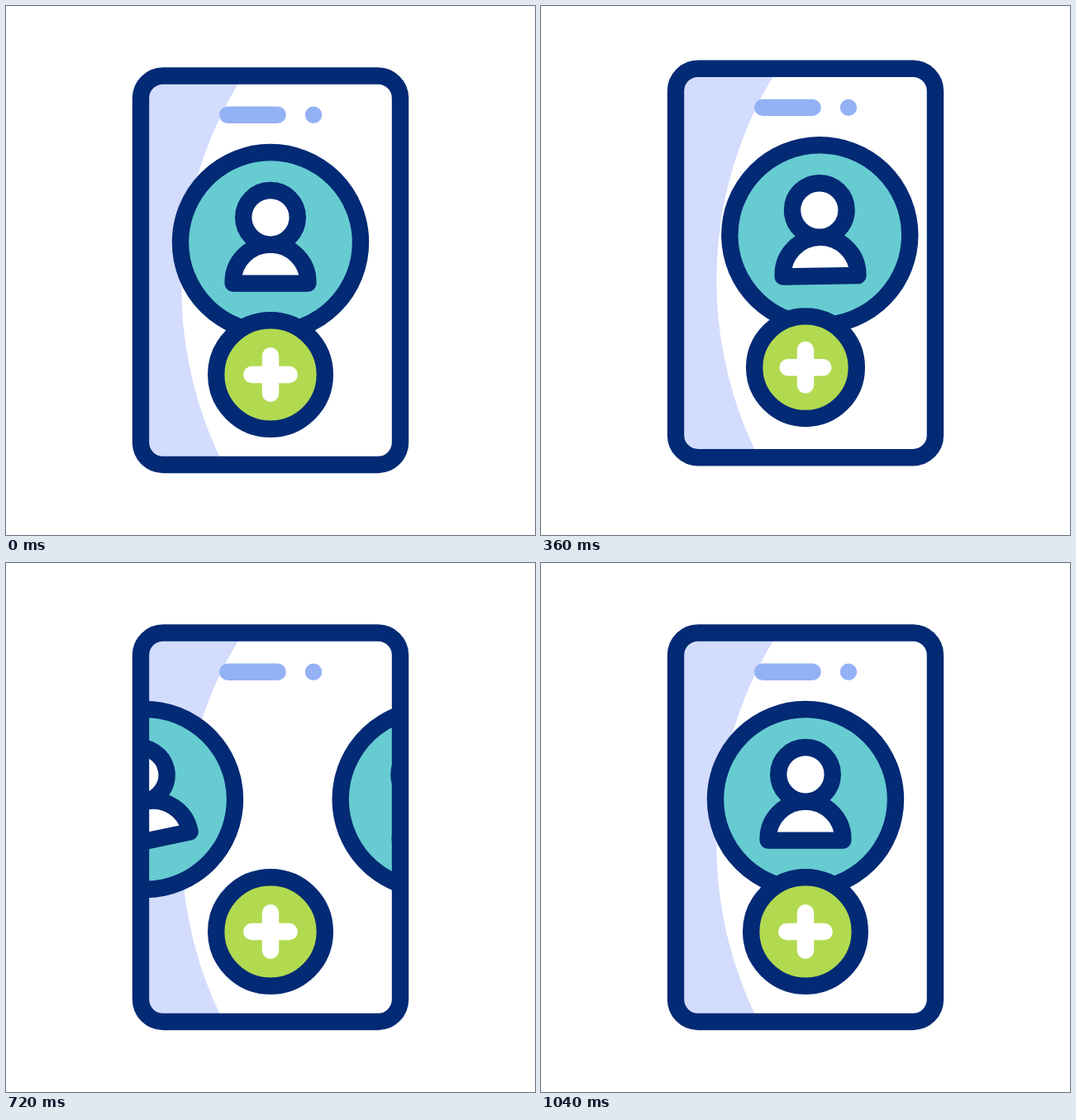
An HTML page for the animation above (1480 ms loop, 640 by 640 pixels).

```html
<!DOCTYPE html>
<html lang="en">
<head>
<meta charset="utf-8">
<title>Add contact</title>
<style>
  html, body { margin: 0; width: 100%; height: 100%; overflow: hidden; background: #fff; }
  svg { display: block; width: 100%; height: 100%; }
  .line { stroke: #032a75; stroke-width: 20.4; stroke-linecap: round; stroke-linejoin: round; }
  .plus { stroke: #fff; }
  .notch { stroke: #93b1f5; }
  .line * { vector-effect: non-scaling-stroke; }
</style>
</head>
<body>
<svg viewBox="0 0 640 640">
  <defs>
    <clipPath id="screen"><rect x="163" y="84.5" width="314" height="470.5" rx="27"/></clipPath>
    <g id="avatar" class="line" fill="#fff">
      <circle r="109" fill="#66ccd1"/>
      <path d="M-45.4 49.6V48a45.4 45.4 0 0 1 90.8 0v1.6z"/>
      <circle cy="-30.2" r="32.8"/>
    </g>
  </defs>
  <g id="phone">
    <g clip-path="url(#screen)">
      <rect x="153" y="74" width="334" height="492" fill="#d3dcfd"/>
      <circle cx="689.3" cy="340.5" r="477" fill="#fff"/>
      <path class="line notch" d="M268.2 131.7h60.4M372 131.7h.01"/>
      <use id="leaving" href="#avatar"/>
      <use id="arriving" href="#avatar"/>
    </g>
    <rect class="line" x="163" y="84.5" width="314" height="470.5" rx="27" fill="none"/>
    <g id="button" class="line">
      <circle r="65.8" fill="#b1da50"/>
      <path class="plus" d="M-22.7 0h45.4M0-22.7v45.4"/>
    </g>
  </g>
</svg>
<script>
const LOOP = 1480, STEP = 40;
const byId = id => document.getElementById(id);
const [phone, leaving, arriving, button] = ['phone', 'leaving', 'arriving', 'button'].map(byId);

// Smooth interpolation through [time, value] keys
function tween(t, keys) {
  let [t0, v0] = keys[0];
  for (const [t1, v1] of keys) {
    if (t < t1) {
      const u = Math.max(0, (t - t0) / (t1 - t0));
      return v0 + (v1 - v0) * u * u * (3 - 2 * u);
    }
    [t0, v0] = [t1, v1];
  }
  return v0;
}

// Fast, steady entry that brakes to a stop in the centre
function entryOffset(t) {
  const r = Math.max(0, 1040 - t) / 160;
  return -r * r * (65.94 - 16.91 * r + 1.47 * r * r);
}

function placeAvatar(el, dx, angle) {
  el.setAttribute('transform', `translate(${320 + dx} 286) rotate(${angle})`);
}

function draw(t) {
  const y = tween(t, [[100, 0], [260, 18], [440, -28], [560, 0]]);
  const press = tween(t, [[100, 1], [260, 0.915], [540, 1]]);
  const out = tween(t, [[240, 0], [1120, 341]]);
  const entry = entryOffset(t);
  phone.setAttribute('transform', `translate(0 ${y})`);
  button.setAttribute('transform', `translate(320 446) scale(${press})`);
  placeAvatar(leaving, out, -0.053 * out);
  placeAvatar(arriving, entry, 0.078 * entry);
}

const start = performance.now();
function frame() {
  const t = (performance.now() - start + 4) % LOOP;
  draw(Math.floor(t / STEP) * STEP);
  requestAnimationFrame(frame);
}
frame();
</script>
</body>
</html>
```
